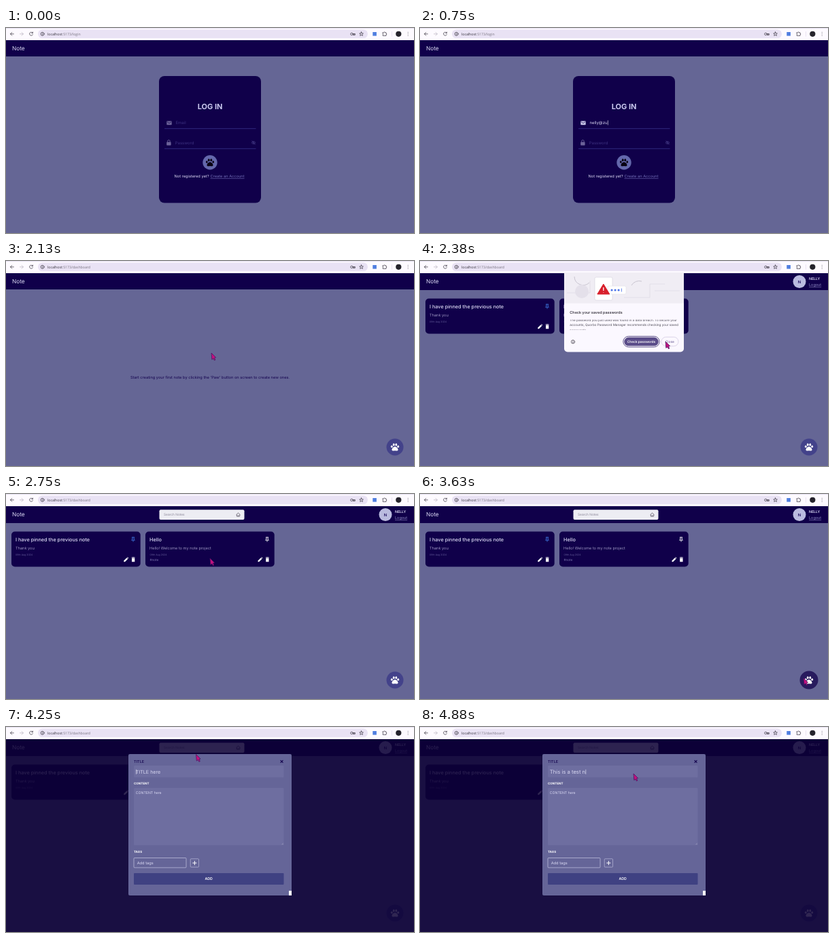
An HTML page for the animation above (5010 ms loop, 600 px wide and 303 px high).

```html
<!DOCTYPE html>
<html lang="en">
<head>
<meta charset="utf-8">
<title>Note</title>
<style>
  html, body { margin: 0; height: 100%; overflow: hidden; }
  svg { display: block; }
  text { font: 5.7px Inter, "Open Sans", sans-serif; fill: #d9d8f2; text-rendering: geometricPrecision; white-space: pre; }
  .mid { text-anchor: middle; }
  .url { font: 5.2px "Open Sans", sans-serif; fill: #34303c; }
  .brand { font-size: 8.3px; }
  .h { font-size: 7.3px; font-weight: 500; fill: #dddcf5; }
  .thin { font-weight: 300; fill: #c0bde0; }
  .tiny { font-size: 3.5px; fill: #665f9b; }
  .label { font-size: 4.5px; font-weight: 700; fill: #fff; }
  .field { font-size: 6px; }
  .hint { fill: #3d3180; }
  .body { font-size: 4.65px; fill: #4d4a55; }
  .line { fill: none; stroke: #47424f; stroke-width: .8; stroke-linecap: round; stroke-linejoin: round; }
  .navy { fill: #10004a; }
  .soft { fill: #6e6ea0; }
  .caret { fill: #f0effc; }
</style>
</head>
<body>
<svg width="600" height="303" viewBox="0 0 600 303">
  <defs>
    <g id="paw">
      <path d="M0-.5C2.5-.5 4.5 2 4.5 4 4.5 6 2 5.5 0 5.2-2 5.5-4.5 6-4.5 4-4.5 2-2.5-.5 0-.5Z"/>
      <ellipse cx="-4.7" cy="-.8" rx="1.4" ry="1.8"/><ellipse cx="-1.8" cy="-3.6" rx="1.4" ry="2"/>
      <ellipse cx="1.8" cy="-3.6" rx="1.4" ry="2"/><ellipse cx="4.7" cy="-.8" rx="1.4" ry="1.8"/>
    </g>
    <g id="tools" fill="#fff">
      <path d="M-3.2 3.2V1.6L1.1-2.7 2.7-1.1-1.6 3.2ZM1.6-3.2L2.3-3.8 3.8-2.3 3.2-1.6Z"/>
      <path d="M8.2-2.8V-3.4H9.6L10-3.8H11.3L11.7-3.4H13.1V-2.8ZM8.5-2.2H12.8V3.3H8.5Z"/>
    </g>
    <path id="pin" d="M-2-3H2M-1.2-3V0L-2.4 1.2H2.4L1.2 0V-3M0 1.2V3.6" fill="none" stroke-width=".9"/>
    <clipPath id="scroll"><rect x="214" y="86.5" width="172" height="15.5"/></clipPath>
  </defs>

  <rect width="600" height="303" fill="#656695"/>
  <rect id="header" class="navy" y="18" width="600" height="24"/>
  <text id="brand" class="brand" x="9" y="32.7">Note</text>

  <g id="login">
    <rect class="navy" x="225" y="71" width="150" height="187.5" rx="8"/>
    <text class="mid" x="300" y="119.7" style="font-size:11px;font-weight:700;fill:#c9c8ee">LOG IN</text>
    <g id="mail" fill="#c8c6e8">
      <rect x="236.3" y="137.4" width="7.4" height="5.8" rx=".7"/>
      <path d="M236.8 138.6L240 140.8 243.2 138.6" fill="none" stroke="#10004a" stroke-width=".7"/>
    </g>
    <g id="lock" fill="#c8c6e8">
      <rect x="236.2" y="168.4" width="6.4" height="5" rx=".7"/>
      <path d="M237.6 168.6V167.4A1.8 1.8 0 0 1 241.2 167.4V168.6" fill="none" stroke="#c8c6e8" stroke-width=".9"/>
    </g>
    <text id="email" class="field" x="249.5" y="142.3"></text>
    <text id="pass" class="field" x="248.7" y="171.5"></text>
    <path d="M233 148.7H367.5M233 178.3H367.5" stroke="#38338c" stroke-width=".8"/>
    <g fill="none" stroke="#453a86" stroke-width=".8">
      <path d="M361 169.5Q364 165.7 367 169.5Q364 173.2 361 169.5M361.6 166.6L366.6 172.4"/>
      <circle cx="364" cy="169.5" r=".9"/>
    </g>
    <circle id="submit" cx="300" cy="198.8" r="10.7" fill="#6468ac"/>
    <use href="#paw" x="300" y="198.8" fill="#080012"/>
    <text x="247.5" y="221.2">Not registered yet?</text>
    <text x="300.5" y="221.2" style="fill:#6f6bb4;text-decoration:underline">Create an Account</text>
  </g>

  <text id="empty" class="mid" x="300" y="174.2" style="fill:#160551">Start creating your first note by clicking the 'Paw' button on screen to create new ones.</text>

  <g id="notes">
    <rect x="225.5" y="23.2" width="125" height="14.8" rx="2" fill="#ededf3"/>
    <text x="232" y="32.3" style="font-size:4.8px;fill:#8b8798">Search Notes</text>
    <path d="M338.5 30.8L341.5 28 344.5 30.8M339.4 30.5V33H343.6V30.5M341.5 33V31.2" fill="none" stroke="#55505f" stroke-width=".8"/>
    <circle cx="558" cy="30.5" r="9.5" fill="#babbdf"/>
    <text class="mid" x="558" y="32.6" style="font-weight:600;fill:#1b0a5a">N</text>
    <text x="572" y="27.6" style="font-size:5.2px;font-weight:600">NELLY</text>
    <text x="572" y="37" style="font-size:5.5px;fill:#8f8cc4;text-decoration:underline">Logout</text>
    <rect class="navy" x="8" y="55.5" width="189.7" height="52" rx="5"/>
    <text class="h" x="14" y="69.5">I have pinned the previous note</text>
    <text class="thin" x="14" y="81.6">Thank you</text>
    <text class="tiny" x="14" y="90.8">09th Aug 2024</text>
    <use href="#pin" x="187" y="67" stroke="#3f78e0"/>
    <use href="#tools" x="176.5" y="97"/>
    <rect class="navy" x="205" y="55.5" width="189.7" height="52" rx="5"/>
    <text class="h" x="211" y="69.5">Hello</text>
    <text class="thin" x="211" y="81.6">Hello! Welcome to my note project</text>
    <text class="tiny" x="211.5" y="90.8">09th Aug 2024</text>
    <text x="211.5" y="98.9" style="font-size:4.7px;fill:#7d78b0">#note</text>
    <use href="#pin" x="384" y="67" stroke="#fff"/>
    <use href="#tools" x="373.7" y="97"/>
  </g>

  <g id="fab">
    <circle id="disc" cx="572" cy="275" r="12.5" fill="#43428a"/>
    <use href="#paw" x="572" y="275" fill="#fff"/>
  </g>

  <g id="modal">
    <rect y="18" width="600" height="285" fill="#0c0034" opacity=".85"/>
    <rect x="180" y="40" width="240" height="209" rx="2" fill="#656598"/>
    <rect x="416" y="242" width="4" height="7" fill="#fff"/>
    <text x="188" y="53.1" style="font-size:5.5px;font-weight:500;fill:#15054f">TITLE</text>
    <path d="M403.6 49.1L407.4 52.9M407.4 49.1L403.6 52.9" stroke="#15054f" stroke-width="1.2"/>
    <rect class="soft" x="188" y="57" width="220.5" height="17.5" rx="1.5"/>
    <text id="title" x="190.8" y="68.6"></text>
    <text class="label" x="188" y="85.3">CONTENT</text>
    <rect class="soft" x="188" y="90" width="220.5" height="84.7" rx="1.5"/>
    <text x="190.8" y="99" style="font-size:5.2px">CONTENT here</text>
    <path d="M405.6 173.8L407.8 171.6M407 173.8L407.8 173" stroke="#c9c9dd" stroke-width=".4"/>
    <text class="label" x="188" y="185.9">TAGS</text>
    <rect x="188" y="193.5" width="77" height="14.4" rx="1" fill="none" stroke="#b9b9d8" stroke-width=".8"/>
    <text x="192.7" y="202.5">Add tags</text>
    <rect x="271.2" y="194.8" width="12.3" height="12.3" rx="1" fill="none" stroke="#b9b9d8" stroke-width=".7"/>
    <path d="M274.3 201H280.4M277.35 197.9V204.1" stroke="#fff"/>
    <rect x="188" y="216" width="220.5" height="17" rx="1" fill="#3f4182"/>
    <text class="mid" x="298.2" y="226.4" style="font-size:5.3px;font-weight:600;fill:#fff">ADD</text>
  </g>

  <rect id="caret" class="caret" width=".6" height="7"/>

  <g id="toolbar">
    <rect width="600" height="18" fill="#fdfaff"/>
    <rect width="600" height=".8" fill="#e4dcf0"/>
    <rect x="47" y="2.5" width="485" height="12.6" rx="6.3" fill="#e9e2f4"/>
    <path class="line" d="M11.3 8.8H6.5M8.7 6.5L6.4 8.8 8.7 11.1M39.2 7.3A2.5 2.5 0 1 0 39.4 9.7M39.4 6V7.6H37.8"/>
    <path class="line" style="stroke:#bdb8c5" d="M20.5 8.8H25.3M23.1 6.5L25.4 8.8 23.1 11.1"/>
    <circle class="line" cx="53.6" cy="8.8" r="2.5"/>
    <path class="line" d="M53.6 8.6V10.2M53.6 7.3V7.4"/>
    <text class="url" x="61" y="10.8">localhost<tspan id="path" fill="#77727f"></tspan></text>
    <circle class="line" cx="508.4" cy="8.9" r="1.7"/>
    <path class="line" d="M510.2 8.5H513.4V10.3H510.4M511.8 8.5V10.3"/>
    <path class="line" d="M522.6 5.9L523.4 7.8 525.4 8 523.9 9.4 524.4 11.4 522.6 10.3 520.8 11.4 521.3 9.4 519.8 8 521.8 7.8Z"/>
    <rect x="539.3" y="6" width="5.6" height="5.6" fill="#4f7ee0"/>
    <path class="line" d="M554.2 6.8H555.8Q556.6 4.6 557.4 6.8H559V8.2Q561.2 9 559 9.8V11.4H554.2V9.9Q555.6 9 554.2 8.1Z"/>
    <path d="M567.5 5V12.5" stroke="#e0d8ec" stroke-width=".7"/>
    <circle cx="577.3" cy="8.8" r="4.1" fill="#25232c"/>
    <path d="M591.2 6.3V6.4M591.2 8.7V8.8M591.2 11.1V11.2" class="line" stroke-width="1.2"/>
  </g>

  <g id="popup">
    <rect x="212" y="17" width="176" height="117.5" rx="5" fill="#fbf8ff"/>
    <rect x="212" y="17" width="176" height="45.5" fill="#f0edf4"/>
    <path d="M216 47H250V29M300 54H338V34H360M345 44H382" fill="none" stroke="#dfdbe5" stroke-width=".8"/>
    <path d="M227 23A13 13 0 0 0 249 32M311 36A13 13 0 0 1 326 30" fill="none" stroke="#c9c5d0"/>
    <circle cx="238" cy="45" r="10" fill="#e4e0ea"/>
    <rect x="257" y="24" width="26" height="34" rx="2" fill="#fff" stroke="#d5d1dc" stroke-width=".6"/>
    <rect x="276" y="37" width="27" height="12" rx="2" fill="#fff" stroke="#dcd8e3" stroke-width=".5"/>
    <path d="M282 43H282.1M287 43H287.1M292 43H292.1" stroke="#4a72e8" stroke-width="3" stroke-linecap="round"/>
    <path d="M296.5 40.5V45.5" stroke="#4a72e8" stroke-width=".8"/>
    <path d="M269.8 34L278.8 49H260.8Z" fill="#d8202c" stroke="#d8202c" stroke-linejoin="round"/>
    <path d="M269.8 39V44M269.8 46.3V46.8" stroke="#fff" stroke-width="1.3"/>
    <text x="220.3" y="78" style="font-weight:500;font-size:5.5px;fill:#29262f">Check your saved passwords</text>
    <g clip-path="url(#scroll)">
      <text class="body" x="220.3" y="88.6">The password you just used was found in a data breach. To secure your</text>
      <text class="body" x="220.3" y="96.4">accounts, Quorbo Password Manager recommends checking your saved</text>
      <text class="body" x="220.3" y="104.2">passwords.</text>
    </g>
    <circle class="line" cx="225" cy="119.4" r="2.6"/>
    <path class="line" d="M225 119.3V120.8M225 118V118.1"/>
    <rect x="298.8" y="111.3" width="53.4" height="15.8" rx="7.9" fill="#fff" stroke="#594b88"/>
    <rect x="300.3" y="112.8" width="50.4" height="12.8" rx="6.4" fill="#5a4c89"/>
    <text class="mid" x="325.5" y="121" style="font-size:4.8px;font-weight:600;fill:#fff">Check passwords</text>
    <rect x="355" y="112.4" width="25" height="13.4" rx="6.7" fill="none" stroke="#d3cce2" stroke-width=".8"/>
    <text class="mid" x="367.3" y="121" style="font-size:4.8px;fill:#5a4c89">Close</text>
  </g>

  <path id="cursor" d="M0 0L6.6 6.6 4.5 7.2 5.8 10.2 4.3 10.8 3 8 .8 9.6Z" fill="#c0127f" stroke="#43105f" stroke-width=".7"/>
</svg>
<script>
const LOOP = 5010, STEP = 125, LAST = 39;
const EMAIL = "nelly@zumor.com", TITLE = "This is a test n";
const $ = id => document.getElementById(id);
const show = (id, on) => $(id).style.display = on ? "" : "none";
const set = (id, attrs) => { for (const k in attrs) $(id).setAttribute(k, attrs[k]); };
const clamp = (v, lo, hi) => Math.min(hi, Math.max(lo, v));

// Pointer path: step, x, y
const route = [
  [14, 299, 180], [15, 301, 196], [17, 302, 136], [19, 361, 119], [20, 361, 118],
  [22, 300, 95], [24, 190, 75], [27, 190, 75], [29, 564, 272], [30, 305, 82],
  [32, 215, 190], [33, 225, 62], [35, 334, 19], [37, 314, 69], [LAST, 314, 69]
];

function pointer(n) {
  const i = clamp(route.findIndex(p => p[0] >= n), 1, route.length - 1);
  const [a, x, y] = route[i - 1], [b, x2, y2] = route[i];
  const f = clamp((n - a) / (b - a), 0, 1);
  return `translate(${x + (x2 - x) * f} ${y + (y2 - y) * f})`;
}

function fill(id, value, hint) {
  $(id).textContent = value || hint;
  $(id).classList.toggle("hint", !value && id !== "title");
}

function placeCaret(id, value) {
  const el = $(id);
  const width = value ? el.getComputedTextLength() : 0;
  set("caret", { x: +el.getAttribute("x") + width + .4, y: el.getAttribute("y") - 5.8 });
}

function draw(n) {
  const login = n < 16, notes = n >= 18, modal = n >= 30;
  show("login", login);
  show("empty", !login && !notes);
  show("notes", notes);
  show("fab", !login);
  show("popup", n === 18 || n === 19);
  show("modal", modal);
  show("cursor", n >= 14);
  set("cursor", { transform: pointer(n) });
  set("header", { height: notes ? 25 : 24 });
  set("brand", { y: notes ? 33.3 : 32.7 });
  set("disc", n === 29 ? { r: 13.5, fill: "#281b5e" } : { r: 12.5, fill: "#43428a" });
  set("submit", { fill: n === 15 ? "#53579b" : "#6468ac" });
  $("path").textContent = ":5173/" + (login ? "login" : "dashboard");

  const email = EMAIL.slice(0, clamp((n - 2) * 2, 0, EMAIL.length));
  const pass = "•".repeat(clamp((n - 11) * 2 - 1, 0, 5));
  const title = TITLE.slice(0, Math.max(0, Math.round((n - 34.4) * 3.5)));
  fill("email", email, "Email");
  fill("pass", pass, "Password");
  fill("title", title, "TITLE here");
  $("title").style.fontSize = title ? "7.7px" : "7.1px";
  set("mail", { opacity: n < 2 ? .5 : 1 });
  set("lock", { opacity: n < 11 ? .5 : 1 });

  show("caret", (n >= 2 && n < 15) || n >= 33);
  if (modal) placeCaret("title", title);
  else if (n < 11) placeCaret("email", email);
  else placeCaret("pass", pass);
}

function tick() {
  draw(Math.min(LAST, Math.floor(performance.now() % LOOP / STEP)));
  requestAnimationFrame(tick);
}
tick();
</script>
</body>
</html>
```
